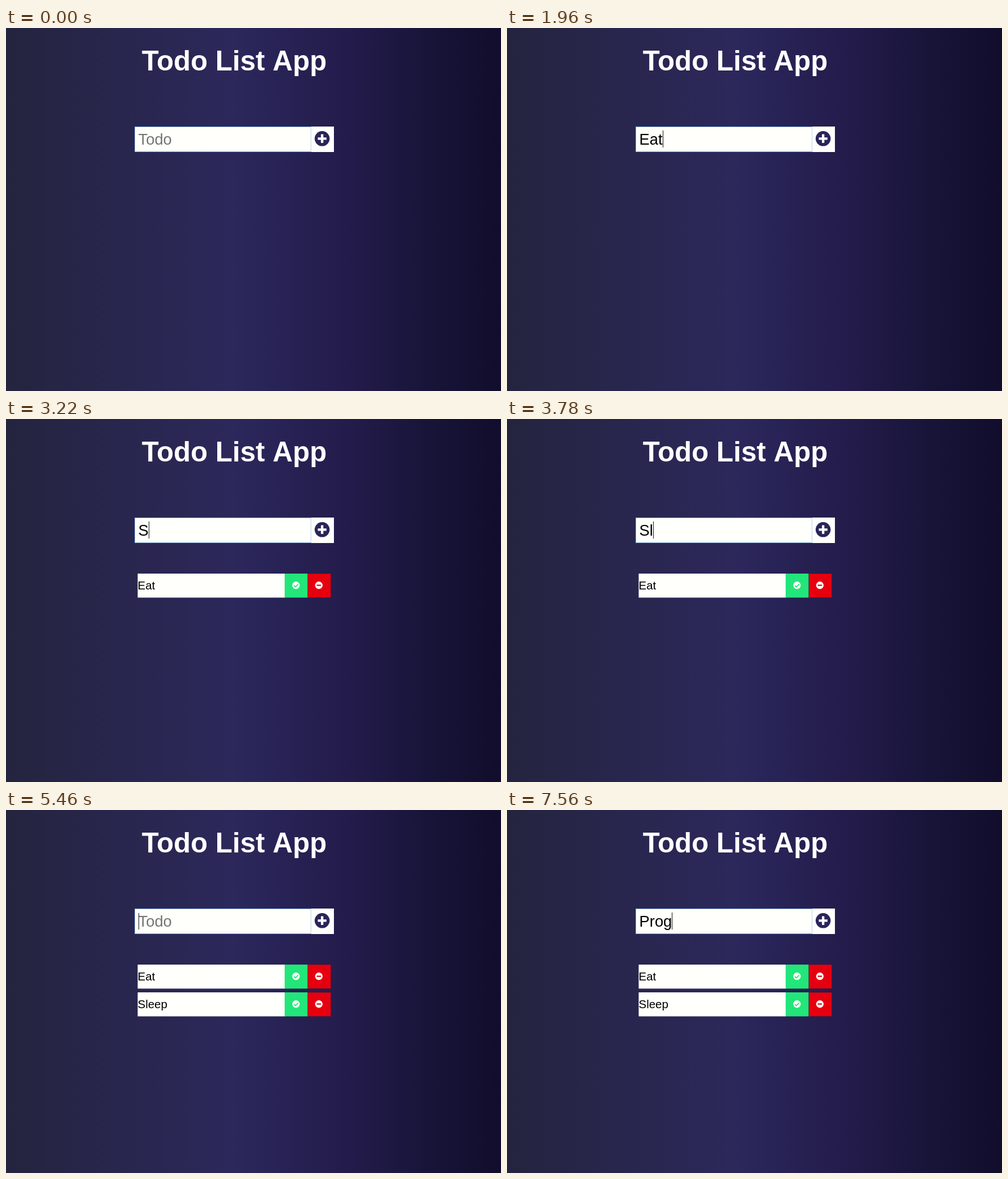
Write an HTML page with a canvas that moves like this. It is 874x641 px and loops after 8 s.

```html
<!DOCTYPE html>
<html lang="en">
<head>
<meta charset="utf-8">
<title>Todo List App</title>
<style>
  html, body { margin: 0; width: 100%; height: 100%; overflow: hidden; }
  canvas { display: block; }
</style>
</head>
<body>
<canvas width="874" height="641"></canvas>
<script>
const ctx = document.querySelector('canvas').getContext('2d');
const LOOP = 8000;
const PAPER = '#fffffc', INK = '#29245a', GREEN = '#22e679', RED = '#e6000f';
const FONT = '"Liberation Sans", Arial, sans-serif';

// [start in ms, typed text, finished items]
const steps = [
  [0, '', 0],
  [960, 'E', 0], [1540, 'Ea', 0], [1960, 'Eat', 0],
  [2380, '', 1],
  [3220, 'S', 1], [3780, 'Sl', 1], [4080, 'Sle', 1], [4480, 'Slee', 1], [4880, 'Sleep', 1],
  [5460, '', 2],
  [6460, 'P', 2], [6860, 'Pr', 2], [7280, 'Pro', 2], [7560, 'Prog', 2]
];
const items = ['Eat', 'Sleep'];

const background = ctx.createLinearGradient(0, 0, 874, 0);
[[0, '#24243f'], [0.46, '#2c285b'], [0.55, '#282356'], [0.7, '#231b4a'], [0.86, '#171438'], [1, '#120d2c']]
  .forEach(stop => background.addColorStop(...stop));

function rect(x, y, w, h, color) {
  ctx.fillStyle = color;
  ctx.fillRect(x, y, w, h);
}

function text(str, x, y, size, color, weight = '') {
  ctx.font = `${weight} ${size}px ${FONT}`;
  ctx.fillStyle = color;
  ctx.fillText(str, x, y);
}

// Round icon with a symbol cut out in the color behind it
function icon(kind, x, y, size, color, hole) {
  const unit = size / 512;
  ctx.save();
  ctx.translate(x, y);
  ctx.scale(unit, unit);
  ctx.fillStyle = color;
  ctx.beginPath();
  ctx.arc(0, 0, 248, 0, 2 * Math.PI);
  ctx.fill();
  ctx.fillStyle = ctx.strokeStyle = hole;
  ctx.beginPath();
  if (kind === 'check') {
    ctx.lineWidth = 64;
    ctx.moveTo(-140, 10);
    ctx.lineTo(-40, 110);
    ctx.lineTo(146, -76);
    ctx.stroke();
  } else {
    ctx.roundRect(-144, -40, 288, 80, 12);
    if (kind === 'plus') ctx.roundRect(-40, -144, 80, 288, 12);
    ctx.fill();
  }
  ctx.restore();
}

function drawInput(typed, showCaret) {
  rect(538, 174, 41, 45, PAPER);
  icon('plus', 558.2, 195.3, 27.3, INK, PAPER);
  rect(227, 174, 312, 45, PAPER);
  ctx.lineWidth = 1;
  ctx.strokeStyle = '#78a9dc';
  ctx.strokeRect(227.5, 174.5, 311, 44);
  rect(538, 175, 1, 43, '#b5d9ee');
  text(typed || 'Todo', 233.6, 206, 27.3, typed ? '#000' : '#757575');
  if (!showCaret) return;
  const caretX = Math.floor(234.1 + ctx.measureText(typed).width);
  const top = typed ? 181 : 182;
  rect(caretX, top, 1, 211 - top, '#111');
}

function drawItem(label, y) {
  rect(232.5, y, 260, 42.4, PAPER);
  rect(492, y, 40.5, 42.4, GREEN);
  rect(533, y, 40.5, 42.4, '#b4000f');
  rect(534, y + 0.7, 39, 41, RED);
  text(label, 232.5, y + 28, 20.48, '#000');
  icon('check', 512, y + 20.6, 13.65, PAPER, GREEN);
  icon('minus', 552.4, y + 20.6, 13.65, PAPER, RED);
}

function draw(now) {
  const time = now % LOOP;
  const [start, typed, done] = steps.findLast(step => step[0] <= time);
  rect(0, 0, 874, 641, background);
  ctx.textAlign = 'center';
  text('Todo List App', 403, 74.5, 49.15, '#fff', 'bold');
  ctx.textAlign = 'left';
  drawInput(typed, start > 0);
  items.slice(0, done).forEach((label, i) => drawItem(label, 273 + 49 * i));
  requestAnimationFrame(draw);
}
draw(0);
</script>
</body>
</html>
```
